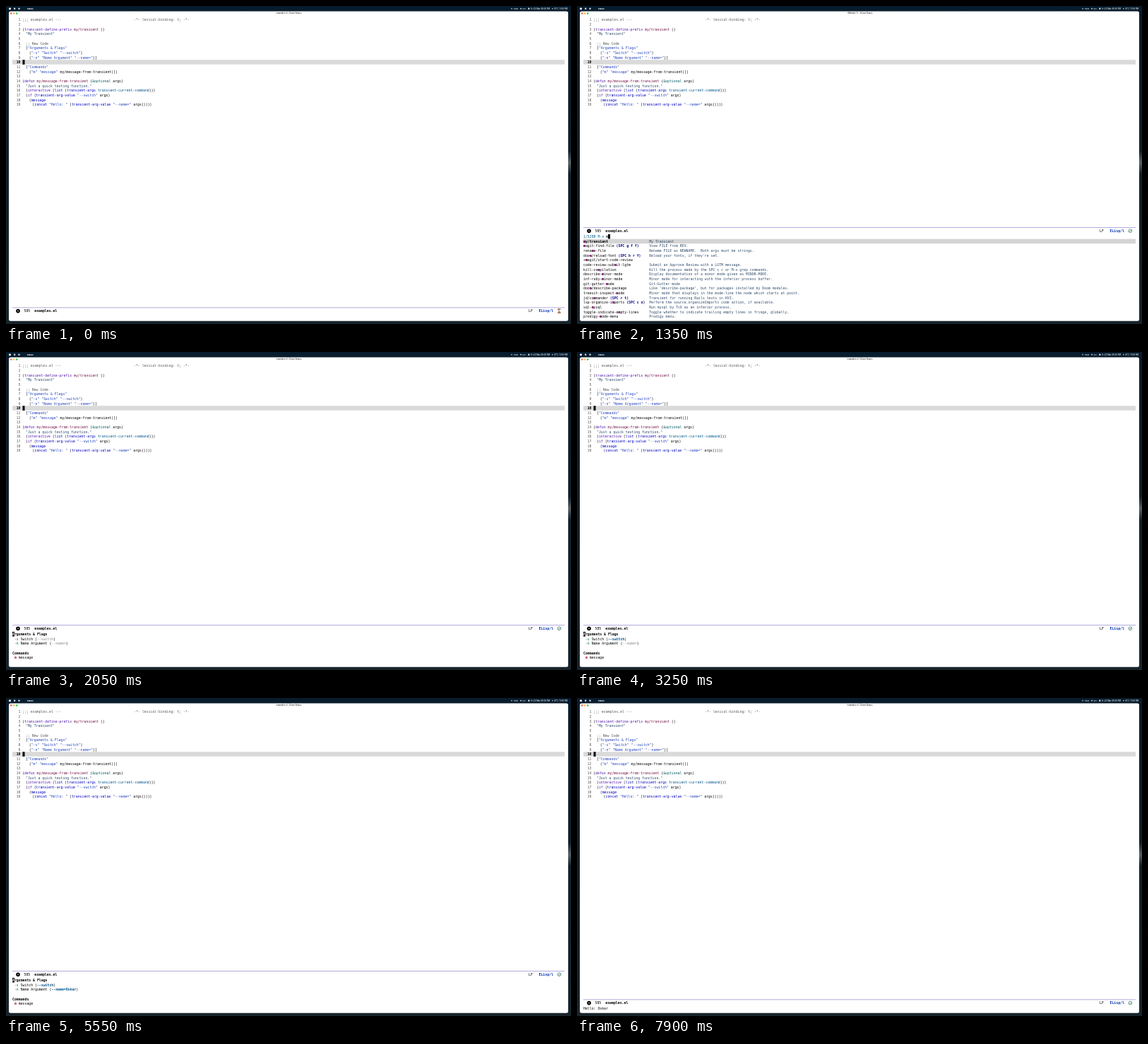
An HTML page with a canvas that plays this animation: 800 px wide and 450 px high, repeating every 8000 ms.

```html
<!DOCTYPE html>
<html lang="en">
<head>
<meta charset="utf-8">
<title>Transient demo</title>
<style>
html, body { margin: 0; width: 100%; height: 100%; overflow: hidden; background: #101c24; }
canvas { display: block; width: 800px; height: 450px; }
</style>
</head>
<body>
<canvas id="stage" width="800" height="450"></canvas>
<script>
const ctx = document.getElementById('stage').getContext('2d');
const LOOP = 8000, CHAR = 2.912, LINE = 6.665, LEFT = 9, CODE_X = 23.2;
const NAME = 'Oskar';

const COLORS = {
  c: '#595959', s: '#2544bb', k: '#5317ac', f: '#721045', b: '#0000c0',
  v: '#00538b', t: '#005a5f', d: '#2a486a', g: '#00702a', r: '#b01030',
  p: '#005e8b', a: '#2f4a68', x: '#000', m: '#8f0075', w: '#fff', i: '#8a8a8a'
};

// {k:text} colours a run; a capital key also makes it bold. The number is the indent level.
const CODE = [
  [0, '{c:;;; examples.el ---}'],
  [0, ''],
  [0, '({k:transient-define-prefix} {f:my/transient} ()'],
  [1, '{d:"My Transient"}'],
  [0, ''],
  [1, '{c:;; New Code}'],
  [1, '[{s:"Arguments & Flags"}'],
  [2, '({s:"-s"} {s:"Switch"} {s:"--switch"})'],
  [2, '({s:"-n"} {s:"Name Argument"} {s:"--name="})]'],
  [0, ''],
  [1, '[{s:"Commands"}'],
  [2, '({s:"m"} {s:"message"} my/message-from-transient)])'],
  [0, ''],
  [0, '({k:defun} {f:my/message-from-transient} ({t:&optional} args)'],
  [1, '{d:"Just a quick testing function."}'],
  [1, '({k:interactive} ({b:list} ({b:transient-args} {v:transient-current-command})))'],
  [1, '({k:if} ({b:transient-arg-value} {s:"--switch"} args)'],
  [2, '({b:message}'],
  [3, '({b:concat} {s:"Hello: "} ({b:transient-arg-value} {s:"--name="} args)))))']
];

// name | key binding | annotation
const HEAD = [
  'my/transient||My Transient',
  'magit-find-file|SPC g f f|View FILE from REV.',
  'rename-file||Rename FILE as NEWNAME.  Both args must be strings.'
];
const ALL_COMMANDS = HEAD.concat([
  'set-cursor-color||Set the text cursor color of the selected frame to COLOR-NAME.',
  "doom/reload-font|SPC h r f|Reload your fonts, if they're set.",
  'describe-face|SPC h f|Display the properties of face FACE on FRAME.',
  "+popup/other|C-x p|Cycle through popup windows, like 'other-window'. Ignores regular windows.",
  '+popup/toggle|SPC ~|Toggle any visible popups.',
  '+popup/raise|C-~|Raise the current popup window into a regular window and',
  "evil-redo|C-r|Undo COUNT changes in buffer using 'evil-redo-function'.",
  'rgrep||Recursively grep for REGEXP in FILES in directory tree rooted at DIR.',
  '+magit/start-code-review||',
  'describe-font||Display information about a font whose name is FONTNAME.',
  'forge-list-authored-pullreqs||List open pull-requests of the current repository that are authored by you.',
  'code-review-submit-lgtm||Submit an Approve Review with a LGTM message.',
  "forge-dispatch|SPC g '|Dispatch a forge command.",
  'forge-list-requested-reviews||List pull-requests of the current repository that are awaiting your review.'
]);
const M_COMMANDS = HEAD.concat([
  "doom/reload-font|SPC h r f|Reload your fonts, if they're set.",
  '+magit/start-code-review||',
  'code-review-submit-lgtm||Submit an Approve Review with a LGTM message.',
  'kill-compilation||Kill the process made by the SPC c c or M-x grep commands.',
  'describe-minor-mode||Display documentation of a minor mode given as MINOR-MODE.',
  'inf-ruby-minor-mode||Minor mode for interacting with the inferior process buffer.',
  'git-gutter-mode||Git-Gutter mode',
  "doom/describe-package||Like 'describe-package', but for packages installed by Doom modules.",
  'treesit-inspect-mode||Minor mode that displays in the mode-line the node which starts at point.',
  'jd/commander|SPC r t|Transient for running Rails tests in KV3.',
  'lsp-organize-imports|SPC c o|Perform the source.organizeImports code action, if available.',
  'sql-mysql||Run mysql by TcX as an inferior process.',
  'toggle-indicate-empty-lines||Toggle whether to indicate trailing empty lines in fringe, globally.',
  'prodigy-mode-menu||Prodigy menu.'
]);

function rect(x, y, w, h, color) {
  ctx.fillStyle = color;
  ctx.fillRect(x, y, w, h);
}

function disc(x, y, r, color) {
  ctx.fillStyle = color;
  ctx.beginPath();
  ctx.arc(x, y, r, 0, 7);
  ctx.fill();
}

// Type is set ten times larger and scaled down, to keep fractional widths.
function type(str, x, y, size, color, weight, family, align) {
  ctx.save();
  ctx.translate(x, y);
  ctx.scale(0.1, 0.1);
  ctx.font = `${weight} ${size * 10}px ${family}`;
  ctx.textAlign = align || 'left';
  ctx.fillStyle = color;
  ctx.fillText(str, 0, 0);
  ctx.restore();
}

function mono(str, x, y, color = '#000', bold = false) {
  type(str, x, y + 1.75, 4.837, color, bold ? 'bold' : 'normal', '"DejaVu Sans Mono", monospace');
}

function ui(str, x, y, size, color, weight = 500, align = 'left') {
  type(str, x, y, size, color, weight, 'Inter, sans-serif', align);
}

function rich(markup, x, y) {
  const parts = markup.split(/\{(\w):([^}]*)\}/);
  let col = 0;
  for (let i = 0; i < parts.length; i++) {
    if (i % 3 === 1) continue;
    const key = i % 3 === 2 ? parts[i - 1] : 'x';
    const low = key.toLowerCase();
    if (parts[i]) mono(parts[i], x + col * CHAR, y, COLORS[low], key !== low);
    col += parts[i].length;
  }
}

function cursor(x, y) {
  rect(x, y - 3.3, 3, 6.6, '#000');
}

function drawDesktop(title) {
  const bg = ctx.createLinearGradient(0, 0, 0, 450);
  bg.addColorStop(0, '#061c2e');
  bg.addColorStop(0.05, '#0e1c27');
  bg.addColorStop(1, '#18242b');
  rect(0, 0, 800, 450, bg);
  const glow = ctx.createLinearGradient(0, 205, 0, 238);
  glow.addColorStop(0, '#5a626800');
  glow.addColorStop(0.5, '#5a6268');
  glow.addColorStop(1, '#5a626800');
  rect(796, 205, 4, 33, glow);

  disc(5.5, 3.8, 1.6, '#e8eef2');
  rect(11, 2.6, 2.3, 2.3, '#c8d0d6');
  disc(18.5, 3.7, 1.3, '#c8d0d6');
  ui('Emacs', 30, 4.7, 2.7, '#fff', 700);
  disc(716, 3.7, 0.8, '#dfe5e9');
  ui('70KB', 718.5, 4.7, 2.6, '#eef2f5');
  disc(729, 3.7, 0.9, '#dfe5e9');
  ui('33%', 731, 4.7, 2.6, '#eef2f5');
  rect(739.3, 2.6, 2, 2.3, '#dfe5e9');
  ui('Fri 22 Mar 06:06 PM', 743, 4.7, 2.75, '#eef2f5');
  disc(773.7, 3.7, 0.8, '#dfe5e9');
  ui('UTC: 11:06 PM', 776, 4.7, 2.75, '#eef2f5');

  ctx.fillStyle = '#fff';
  ctx.beginPath();
  ctx.roundRect(4, 7.6, 792, 438.2, 2.5);
  ctx.fill();
  ['#fb5f57', '#fdbc2e', '#28c840'].forEach((color, i) => disc(7.2 + i * 4, 10.4, 1.25, color));
  ui(title + ' – Doom Emacs', 400.5, 11.2, 2.75, '#333', 500, 'center');
}

function drawCode(focused) {
  rect(LEFT, 76.2, 782, 6.5, '#dadada');
  CODE.forEach(([level, text], i) => {
    const y = 19.6 + i * LINE, n = String(i + 1), here = i === 9;
    mono(n, 20.5 - n.length * CHAR, y, here ? '#000' : '#595959', here);
    rich(text, CODE_X + level * 4.8, y);
  });
  mono('-*- lexical-binding: t; -*-', 181, 19.6, COLORS.c);
  if (focused) cursor(23.5, 79.5);
}

function drawModeLine(y, checked) {
  rect(LEFT, y - 5.2, 782, 0.9, '#a9a3da');
  disc(17, y, 2.8, '#000');
  disc(17, y, 0.8, '#fff');
  mono('585', 25.5, y);
  mono('examples.el', 40.3, y, '#000', true);
  mono('LF', 740, y);
  mono('ELisp/l', 754.5, y, '#0031a9', true);
  ctx.beginPath();
  if (checked) {
    ctx.arc(783.3, y, 2.4, 0, 7);
    ctx.moveTo(782, y);
    ctx.lineTo(783, y + 1);
    ctx.lineTo(785, y - 1.2);
    ctx.strokeStyle = '#286e5c';
    ctx.lineWidth = 0.7;
    ctx.stroke();
  } else {
    for (const s of [-1, 1]) {
      ctx.moveTo(783.3, y);
      ctx.lineTo(781.6, y + s * 2.5);
      ctx.lineTo(785, y + s * 2.5);
    }
    ctx.strokeStyle = '#8a4a20';
    ctx.lineWidth = 0.8;
    ctx.closePath();
    ctx.stroke();
    rect(781.2, y - 3, 4.2, 0.8, '#8a4a20');
    rect(781.2, y + 2.2, 4.2, 0.8, '#8a4a20');
  }
}

function drawPrompt(label, input, y) {
  rich(`{p:${label}}${input}`, LEFT, y);
  cursor(LEFT + (label.length + input.length) * CHAR, y);
}

function drawCommands(count, input, rows) {
  drawPrompt(`1/${count} M-x `, input, 326.3);
  rect(LEFT, 329.7, 782, 6.5, '#d4d4d4');
  rows.forEach((row, i) => {
    const [name, key, note] = row.split('|');
    const y = 333 + i * LINE, hit = input ? name.indexOf(input) : -1;
    mono(name, LEFT, y, '#000', i === 0);
    if (hit >= 0) mono(input, LEFT + hit * CHAR, y, COLORS.m, true);
    if (key) mono(`(${key})`, LEFT + (name.length + 1) * CHAR, y, '#000080', true);
    mono(note, LEFT + 32 * CHAR, y, COLORS.a);
  });
}

function drawTransient(switchOn, value, reading) {
  const row = i => 399.2 + i * LINE;
  if (reading) rect(LEFT, row(2) - 3.3, 27 * CHAR, 6.6, '#aee6d6');
  const flag = (text, on) => `({${on ? 'V' : 'i'}:${text}})`;
  mono('Arguments & Flags', LEFT, row(0), '#000', true);
  cursor(LEFT, row(0));
  mono('A', LEFT, row(0), '#fff', true);
  rich(' {g:-s} Switch ' + flag('--switch', switchOn), LEFT, row(1));
  rich(' {g:-n} Name Argument ' + (reading ? '(--name=)' : flag('--name=' + value, value)), LEFT, row(2));
  mono('Commands', LEFT, row(4), '#000', true);
  rich(' {R:m} message', LEFT, row(5));
}

function draw(t) {
  const picking = t >= 400 && t < 1750;
  const menu = t >= 1750 && t < 6050;
  const reading = t >= 3950 && t < 5250;
  const focused = !picking && !reading;

  drawDesktop(focused ? 'examples.el' : '*Minibuf-1*');
  drawCode(focused);
  drawModeLine(picking ? 318.2 : menu ? 391.2 : 431.6, t >= 1000);

  if (picking) {
    if (t < 1300) drawCommands(10119, '', ALL_COMMANDS);
    else drawCommands(5288, 'm', M_COMMANDS);
  }
  if (menu) drawTransient(t >= 3050, t >= 5250 ? NAME : '', reading);
  if (reading) {
    const typed = [4400, 4500, 4600, 4850, 4950].filter(k => t >= k).length;
    drawPrompt('--name=', NAME.slice(0, typed), 439.4);
  }
  if (t >= 6050) mono('Hello: ' + NAME, LEFT, 439.4);
}

const start = performance.now();
function tick() {
  draw((performance.now() - start) % LOOP);
  requestAnimationFrame(tick);
}
tick();
</script>
</body>
</html>
```
